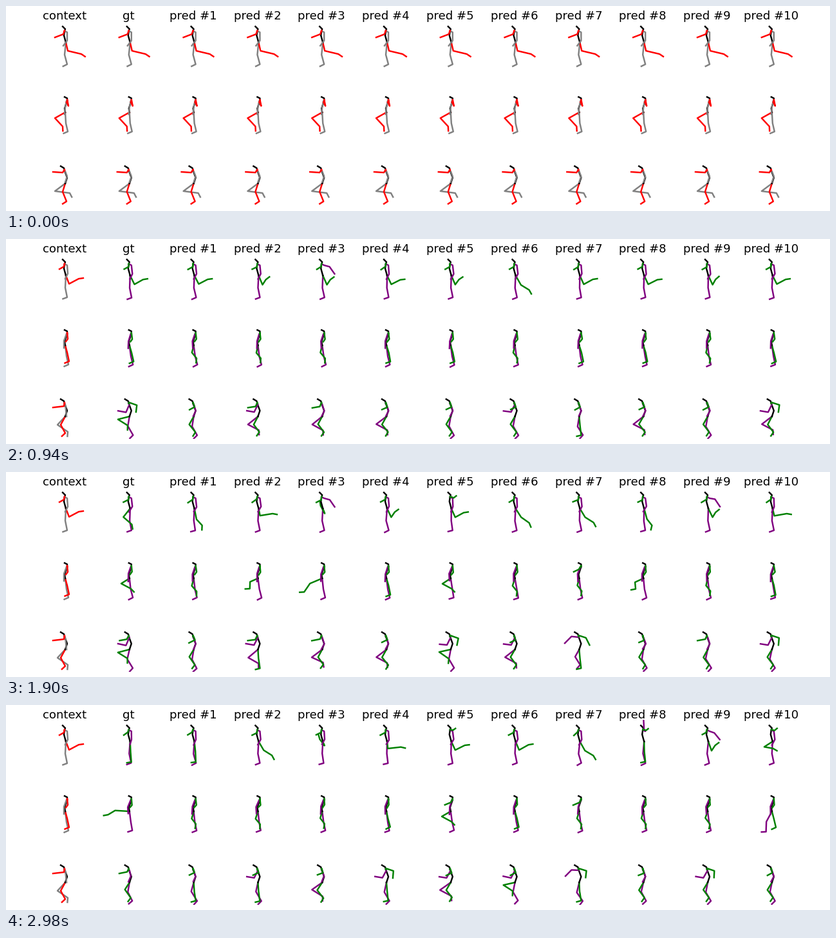
Animation, 1280 px wide and 320 px high, one loop 3 s. Source, as a matplotlib script:

```python
import numpy as np
import matplotlib.pyplot as plt
from matplotlib.animation import FuncAnimation
from matplotlib.collections import LineCollection
from matplotlib.patches import Rectangle

FRAMES, CONTEXT, FIRST_KEY = 150, 30, 47
TITLES = ["context", "gt"] + [f"pred #{i}" for i in range(1, 11)]
LIMBS = ("arm_a", "arm_b", "leg_a", "leg_b")

# Limb poses are (x, y) of elbow and hand, or of knee and ankle, in pixels from
# the figure's origin. "start" and "rest" bound the context part.
STANDING = dict(
    y=0, flex=20, shoulder_a=(0, 38), shoulder_b=(4, 41),
    spine=[(-3, 32), (1, 36), (0, 39), (-1, 46), (2, 57)],
    start=[(-2, 44, -15, 49), (4, 54, -2, 62), (5, 70, 26, 75), (0, 76, 4, 91)],
    rest=[(-1, 43, -8, 47), (5, 54, 1, 62), (7, 70, 22, 62), (1, 76, 4, 91)],
    poses=dict(
        raised=(8, 70, 22, 63), level=(4, 68, 24, 65), back=(10, 71, 23, 79),
        fold=(8, 71, 13, 63), step=(6, 74, 14, 84), stand=(3, 73, 4, 89),
        tuck=(-9, 71, 4, 82), hang=(4, 64, -2, 53), cross=(-10, 66, 3, 68),
        up=(5, 40, 9, 37), high=(2, 38, 1, 24), out=(12, 43, 20, 54)))
SWINGING = dict(
    y=100, flex=10, shoulder_a=(4, 46), shoulder_b=(3, 48),
    spine=[(0, 42), (4, 44), (4, 48), (0, 60), (1, 66)],
    start=[(6, 56, 3, 50), (1, 58, 0, 69), (-15, 75, -3, 88), (2, 83, 5, 96)],
    rest=[(5, 56, 2, 60), (-1, 59, -1, 70), (4, 77, 7, 91), (3, 83, 6, 96)],
    poses=dict(
        bent=(-2, 77, 5, 86), kick=(-18, 74, -27, 87), swing=(-12, 72, -12, 82),
        knee=(-13, 74, 2, 82), out=(-21, 65, -32, 71), behind=(-7, 82, -8, 98),
        fold=(1, 52, -8, 56)))
RUNNING = dict(
    y=200, flex=55, shoulder_a=(0, 55), shoulder_b=(1, 58),
    spine=[(-6, 50), (-1, 53), (0, 57), (4, 68), (1, 77)],
    start=[(-3, 60, -18, 59), (4, 66, 1, 75), (-3, 90, 3, 105), (-15, 89, 8, 92)],
    rest=[(-1, 61, -18, 63), (2, 67, 3, 77), (-6, 90, 1, 103), (-11, 90, 5, 101)],
    poses=dict(
        high=(-17, 81, -2, 91), crouch=(-6, 89, 3, 101), straight=(2, 91, 4, 106),
        lunge=(-15, 89, 2, 98), push=(-2, 92, 6, 106), front=(-3, 61, -15, 63),
        chest=(2, 62, -6, 66), low=(4, 68, 0, 76), behind=(12, 59, 11, 70),
        reach=(-5, 70, -17, 68), wide=(11, 56, 28, 70), spread=(-11, 57, -21, 67)))
ROWS = [STANDING, SWINGING, RUNNING]

# What each figure does after the context: pose names spread evenly over time.
CAST = [
    [dict(leg_a="raised raised tuck tuck stand"),
     dict(leg_a="raised level step stand stand"),
     dict(leg_a="fold fold level back back"),
     dict(leg_a="fold hang hang", arm_b="out out out rest"),
     dict(leg_a="raised level fold level level"),
     dict(leg_a="fold raised raised", arm_a="rest up up"),
     dict(leg_a="back back raised"),
     dict(leg_a="raised back back"),
     dict(leg_a="raised level step stand stand", arm_a="rest rest up", arm_b="rest rest high"),
     dict(leg_a="fold", arm_b="rest out out out"),
     dict(leg_a="raised raised level cross cross", arm_a="rest rest up")],
    [dict(leg_a="rest rest knee out out"),
     dict(leg_a="bent"),
     dict(leg_a="bent swing swing knee bent"),
     dict(leg_a="bent kick kick bent bent"),
     dict(),
     dict(leg_a="rest bent knee knee knee", arm_a="rest rest fold"),
     dict(leg_a="bent kick bent rest rest"),
     dict(leg_a="rest bent bent", arm_a="rest fold fold"),
     dict(leg_a="rest knee swing bent bent"),
     dict(leg_a="bent"),
     dict(leg_b="rest rest behind")],
    [dict(leg_a="high high crouch", leg_b="push", arm_a="behind front front", arm_b="reach reach low"),
     dict(leg_a="crouch crouch straight", leg_b="push", arm_a="chest", arm_b="low"),
     dict(leg_a="crouch straight straight", leg_b="lunge lunge push", arm_a="front front chest", arm_b="reach"),
     dict(leg_a="crouch", leg_b="lunge", arm_a="front front chest", arm_b="low"),
     dict(leg_a="crouch crouch straight", leg_b="lunge lunge push", arm_a="chest chest behind", arm_b="low low reach"),
     dict(leg_a="crouch high crouch", leg_b="push push lunge", arm_a="chest behind chest", arm_b="low reach reach"),
     dict(leg_a="crouch crouch high", leg_b="push lunge push", arm_a="chest", arm_b="reach"),
     dict(leg_a="straight", leg_b="push crouch push", arm_a="chest behind wide behind", arm_b="low spread spread"),
     dict(leg_a="crouch", leg_b="lunge push push", arm_a="chest", arm_b="low"),
     dict(leg_a="crouch", leg_b="push", arm_a="chest front behind", arm_b="low low reach"),
     dict(leg_a="crouch", leg_b="lunge push push", arm_a="behind behind chest", arm_b="reach reach low")],
]


def ease_through(times, values):
    """Ease from key to key, sampled at every frame."""
    t = np.arange(FRAMES)
    i = np.clip(np.searchsorted(times, t, side="right") - 1, 0, len(times) - 2)
    u = ((t - times[i]) / (times[i + 1] - times[i]))[:, None]
    u = u * u * (3 - 2 * u)
    return values[i] * (1 - u) + values[i + 1] * u


def limb_path(row, limb, names):
    index = LIMBS.index(limb)
    start, rest = row["start"][index], row["rest"][index]
    names = names.split()
    if len(names) == 1:
        names *= 2
    keys = [row["poses"].get(name, rest) for name in names]
    times = np.r_[0, CONTEXT - 1, np.linspace(FIRST_KEY, FRAMES - 1, len(keys))]
    return ease_through(times, np.array([start, rest, *keys], float))


def sway(rng):
    """Slow drift of the joints that fades in after the context."""
    t = np.clip(np.arange(FRAMES) - CONTEXT, 0, None)[:, None] / FRAMES
    return rng.uniform(0, 1, 4) * np.sin(2 * np.pi * rng.uniform(0.5, 1.5, 4) * t)


rng = np.random.default_rng(4)
motion = {}
for r, row in enumerate(ROWS):
    for col in range(len(TITLES)):
        moves = CAST[r][col - 1] if col else {}
        for limb in LIMBS:
            path = limb_path(row, limb, moves.get(limb, "rest"))
            if col:
                path += sway(rng)
            motion[r, col, limb] = path


def toe(knee, ankle, flex):
    """The foot turns square to the shin as the shin becomes upright."""
    shin = ankle - knee
    shin = shin / max(np.hypot(*shin), 1e-6)
    turn = np.radians(flex + (85 - flex) * max(shin[1], 0) ** 3)
    c, s = np.cos(turn), np.sin(turn)
    return ankle + 7 * np.array([shin[0] * c - shin[1] * s, shin[0] * s + shin[1] * c])


def chains(r, col, frame):
    """Polylines of one figure, back to front."""
    row = ROWS[r]
    spine = np.array(row["spine"], float)
    joints = {limb: motion[r, col, limb][frame].reshape(2, 2) for limb in LIMBS}

    def leg(side):
        knee, ankle = joints["leg_" + side]
        return np.array([spine[-1], knee, ankle, toe(knee, ankle, row["flex"])])

    def arm(side):
        return np.vstack([spine[2], row["shoulder_" + side], joints["arm_" + side]])

    offset = (91 + 99.8 * col, row["y"])
    return [part + offset for part in (leg("b"), leg("a"), spine, arm("b"), arm("a"))]


def palette(col, frame):
    a, b = ("green", "purple") if col and frame >= CONTEXT else ("red", "gray")
    return [b, a, "black", b, a]


fig = plt.figure(figsize=(12.8, 3.2), dpi=100, facecolor="white")
ax = fig.add_axes([0, 0, 1, 1])
ax.set(xlim=(0, 1280), ylim=(320, 0))
ax.axis("off")
for col, title in enumerate(TITLES):
    ax.text(91 + 99.8 * col, 21, title, ha="center", va="baseline",
            family="DejaVu Sans", fontsize=13.1)

figures = []
for r in range(3):
    lines = LineCollection([], linewidths=1.75, capstyle="projecting", joinstyle="round")
    ax.add_collection(lines, autolim=False)
    lines.set_clip_path(Rectangle((0, 0), 1280, 96 + 108 * r, transform=ax.transData))
    figures.append(lines)


def update(frame):
    cols = range(len(TITLES))
    shown = [min(frame, CONTEXT - 1)] + [frame] * (len(TITLES) - 1)
    for r, lines in enumerate(figures):
        lines.set_segments([part for c in cols for part in chains(r, c, shown[c])])
        lines.set_color([color for c in cols for color in palette(c, frame)])
    return figures


anim = FuncAnimation(fig, update, frames=FRAMES, interval=20, repeat=True, repeat_delay=0)
plt.show()
```
